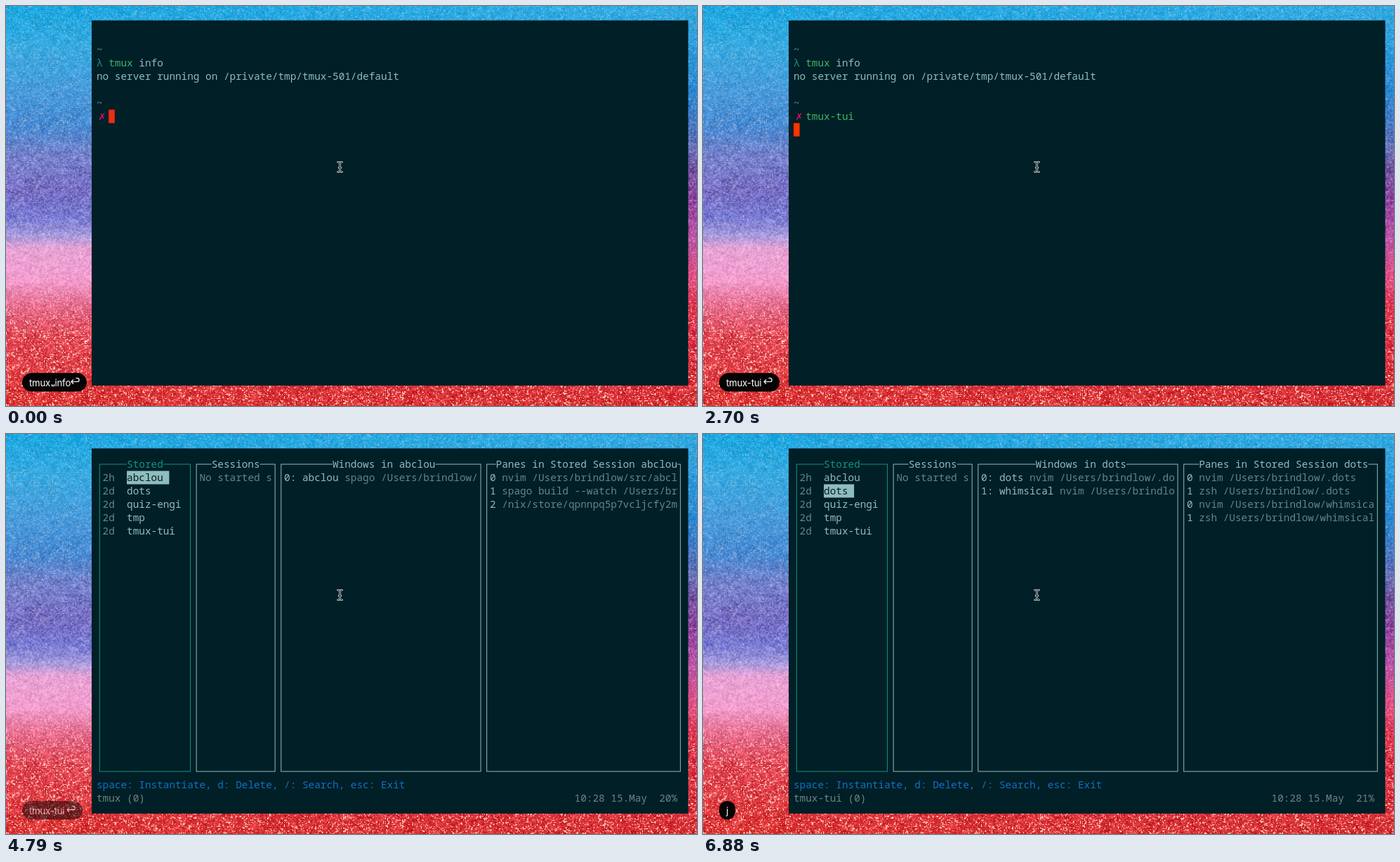
An HTML page with a canvas that plays this animation: 984 by 569 pixels, repeating every 8000 ms.

```html
<!DOCTYPE html>
<html lang="en">
<head>
<meta charset="utf-8">
<title>tmux-tui</title>
<style>
  html, body { margin: 0; width: 100%; height: 100%; overflow: hidden; background: #001f27; }
  canvas, svg { position: absolute; left: 0; top: 0; width: 984px; height: 569px; }
  text { white-space: pre; }
  #screen text { font: 14.36px "Noto Sans Mono", monospace; }
  #screen .bold { font-weight: 700; }
  #screen .cross { font: bold 13px "DejaVu Sans", sans-serif; }
  #keys text { font: 13.2px Inter, sans-serif; letter-spacing: -.2px; fill: #fff; }
  #keys path { fill: none; stroke: #fff; stroke-width: 1.2; }
</style>
</head>
<body>
<canvas id="wall" width="984" height="569"></canvas>
<svg viewBox="0 0 984 569">
  <defs><path id="beam" d="M472.5 222q3 0 3 2.5v9q0 2.500-3 2.500M478.500 222q-3 0-3 2.500M478.500 236q-3 0-3-2.500M474 230h3"/></defs>
  <rect x="122" y="20.5" width="849.5" height="519.5" fill="#001f27"/>
  <g id="screen"></g>
  <g id="keys"></g>
  <g fill="none" stroke-linecap="round">
    <use href="#beam" stroke="#d5dcde" stroke-width="2.600"/>
    <use href="#beam" stroke="#10181b"/>
  </g>
</svg>
<script>
const LOOP = 8000, CELL = 8.615, LINE = 19, LEFT = 129, TOP = 33.5;
const C = { bg: '#001f27', text: '#8fbdbd', dim: '#5d8989', gray: '#6f8285', teal: '#12947f',
            green: '#3db665', red: '#e50f1c', pink: '#d8106f', blue: '#1171c4', cursor: '#ff3300' };
const $ = id => document.getElementById(id);

// ---- wallpaper ----
const leftStops = [
  [0, 18, 165, 224], [60, 52, 168, 224], [120, 66, 152, 218], [170, 66, 136, 210],
  [210, 110, 126, 202], [260, 114, 106, 194], [300, 112, 116, 207], [325, 160, 150, 220],
  [345, 230, 160, 213], [390, 240, 152, 204], [425, 228, 104, 140], [470, 222, 64, 78], [569, 216, 44, 44]];
const rightStops = [
  [0, 45, 170, 226], [120, 34, 134, 212], [190, 82, 110, 186], [235, 115, 80, 160],
  [280, 142, 62, 156], [330, 184, 82, 164], [380, 222, 76, 132], [430, 220, 46, 72], [569, 210, 42, 46]];

const mix = (a, b, k) => a + (b - a) * k;
const ramp = (v, lo, hi) => Math.min(1, Math.max(0, (v - lo) / (hi - lo)));

function colorAt(stops, y) {
  let i = 1;
  while (i < stops.length - 1 && y > stops[i][0]) i++;
  const a = stops[i - 1], b = stops[i], k = ramp(y, a[0], b[0]);
  return [1, 2, 3].map(c => mix(a[c], b[c], k));
}

function hash(x, y) {
  let h = Math.imul(x, 374761393) ^ Math.imul(y, 668265263);
  h = Math.imul(h ^ (h >>> 13), 1274126177);
  return ((h ^ (h >>> 16)) >>> 0) / 4294967296;
}

function noise(x, y) {
  const i = Math.floor(x), j = Math.floor(y), u = x - i, v = y - j;
  return mix(mix(hash(i, j), hash(i + 1, j), u), mix(hash(i, j + 1), hash(i + 1, j + 1), u), v);
}

function paintWall() {
  const ctx = $('wall').getContext('2d'), img = ctx.createImageData(984, 569);
  for (let y = 0; y < 569; y++) {
    const l = colorAt(leftStops, y), r = colorAt(rightStops, y);
    const amp = 30 + 25 * ramp(y, 120, 230) - 20 * ramp(y, 300, 360) + 20 * ramp(y, 390, 450);
    const spark = .35 + .6 * ramp(y, 385, 470);
    for (let x = 0; x < 984; x++) {
      if (x > 123 && x < 970 && y > 21 && y < 539) continue;
      const k = x < 123 ? 0 : x / 984, p = (y * 984 + x) * 4;
      const g = .7 * noise(x / 1.7, y / 1.7) + .3 * noise(x / 7 + 90, y / 5) - .5;
      const hot = spark * ramp(noise(x / 1.5 + 300, y / 1.5), .6, .92);
      [255, 220, 208].forEach((s, c) => {
        img.data[p + c] = mix(mix(l[c], r[c], k) + g * amp * 1.5, s, hot);
      });
      img.data[p + 3] = 255;
    }
  }
  ctx.putImageData(img, 0, 0);
}

// ---- terminal ----
const colX = c => LEFT + c * CELL, rowY = r => TOP + r * LINE;
const put = (r, c, s, fill = C.text, cls = '') =>
  `<text x="${colX(c)}" y="${rowY(r) + 14.3}" fill="${fill}" class="${cls}">${s}</text>`;
const block = (r, c, n, fill) =>
  `<rect x="${colX(c)}" y="${rowY(r)}" width="${n * CELL}" height="${LINE}" fill="${fill}"/>`;
const cursor = (r, c, fill = C.cursor) => block(r, c, 1, fill);
const failure = 'no server running on /private/tmp/tmux-501/default';

function shell({ typed = '', color = C.green, ran = 0, tint }) {
  const out = put(1, 0, '~', C.dim) + put(2, 0, 'λ', C.teal) + put(2, 2, 'tmux', C.green) +
    put(2, 7, 'info') + put(3, 0, failure) + put(5, 0, '~', C.dim) +
    put(6, .3, '✗', C.pink, 'cross') + put(6, 2, typed, color, color === C.red ? 'bold' : '');
  if (!ran) return out + cursor(6, 2 + typed.length, tint);
  return out + (ran > 1 ? put(7, 0, failure) : '') + cursor(6 + ran, 0);
}

const status = (name, load) =>
  put(25, 0, `${name} (0)`, C.gray) + put(25, 79, `10:28 15.May  ${load}%`, C.gray);

const launch = () => put(0, 0, "^Ztmux-tui || echo 'Could not run: tmux-tui'") +
  cursor(1, 0) + status('tmux', 20);

function frame(c0, c1, title, at, color = C.text) {
  const x = colX(c0 + .5), y = rowY(.5);
  return `<rect x="${x}" y="${y}" width="${(c1 - c0) * CELL}" height="${23 * LINE}" fill="none" stroke="${color}"/>` +
    block(0, at, title.length, C.bg) + put(0, at, title, color);
}

const stored = [['2h', 'abclou'], ['2d', 'dots'], ['2d', 'quiz-engi'], ['2d', 'tmp'], ['2d', 'tmux-tui']];
const home = '/Users/brindlow';
const views = [
  { windows: [['0: abclou', `spago ${home}/`]],
    panes: [`nvim ${home}/src/abcl`, 'spago build --watch /Users/br', '/nix/store/qpnnpq5p7vcljcfy2m'],
    ids: [0, 1, 2], status: ['tmux', 20] },
  { windows: [['0: dots', `nvim ${home}/.do`], ['1: whimsical', 'nvim /Users/brindlo']],
    panes: [`nvim ${home}/.dots`, `zsh ${home}/.dots`, `nvim ${home}/whimsica`, `zsh ${home}/whimsical`],
    ids: [0, 1, 0, 1], status: ['tmux-tui', 21] }];

function tui({ pick }) {
  const view = views[pick], name = stored[pick][1], paneTitle = `Panes in Stored Session ${name}`;
  let out = frame(0, 15, 'Stored', 5, C.teal) + frame(16, 29, 'Sessions', 19) +
    frame(30, 63, `Windows in ${name}`, 39 + pick) + frame(64, 96, paneTitle, 66 + pick);
  stored.forEach(([age, s], i) => {
    const on = i === pick;
    if (on) out += block(i + 1, 5, s.length + 1, C.text);
    out += put(i + 1, 1, age, C.dim) + put(i + 1, 5, s, on ? C.bg : C.text);
  });
  out += put(1, 17, 'No started s', C.dim);
  view.windows.forEach(([s, cmd], i) => {
    out += put(i + 1, 31, s) + put(i + 1, 32 + s.length, cmd, C.dim);
  });
  view.panes.forEach((s, i) => {
    out += put(i + 1, 65, view.ids[i]) + put(i + 1, 67, s, C.dim);
  });
  return out + put(24, 0, 'space: Instantiate, d: Delete, /: Search, esc: Exit', C.blue) + status(...view.status);
}

// ---- keystroke pills: width, then text and an optional second word ----
const labels = {
  t: [24], tmu: [46], tmux: [53], 'tmux-t': [61], 'tmux-tui': [73], j: [23],
  'tmux-tui↩': [86, 'tmux-tui'], 'tmux info↩': [92, 'tmux', 'info']
};
const enter = x => `<path d="M${x + 3.5} 531.500l-3 3 3 3M${x + .5} 534.500h8.500a2.600 2.600 0 0 0 0-5.200h-2"/>`;

function pill(key, alpha = 1, lift = 0) {
  if (!key) return '';
  const [w, s = key, next] = labels[key], short = s.length === 1;
  let out = `<rect x="23" y="522" width="${w}" height="26.500" rx="${Math.min(13.25, w / 2)}" fill="#060304"/>` +
    `<text x="${short ? 23 + w / 2 : 33}" y="540.500" text-anchor="${short ? 'middle' : 'start'}">${s}</text>`;
  if (next) out += `<path d="M65.500 538v2.500h3v-2.500"/><text x="69.500" y="540.500">${next}</text>`;
  if (key.endsWith('↩')) out += enter(w + .5);
  return `<g opacity="${alpha}" transform="translate(0 ${-lift})">${out}</g>`;
}

// ---- timeline ----
const steps = [
  { at: 0, draw: shell, tint: '#f02c12', key: 'tmux info↩' },
  { at: 1500, draw: shell, typed: 't', key: 't', old: 'tmux info↩' },
  { at: 1650, draw: shell, typed: 'tm', color: C.red, key: 't' },
  { at: 1800, draw: shell, typed: 'tmux', key: 'tmu' },
  { at: 1950, draw: shell, typed: 'tmux-', color: C.red, key: 'tmux' },
  { at: 2100, draw: shell, typed: 'tmux-t', color: C.red, key: 'tmux-t' },
  { at: 2250, draw: shell, typed: 'tmux-tui', key: 'tmux-tui' },
  { at: 2700, draw: shell, typed: 'tmux-tui', ran: 1, key: 'tmux-tui↩' },
  { at: 2840, draw: shell, typed: 'tmux-tui', ran: 2, key: 'tmux-tui↩' },
  { at: 3290, draw: launch, key: 'tmux-tui↩' },
  { at: 3590, draw: tui, pick: 0, key: 'tmux-tui↩' },
  { at: 4790, draw: tui, pick: 0, key: 'tmux-tui↩', alpha: .5 },
  { at: 4940, draw: tui, pick: 0 },
  { at: 6730, draw: tui, pick: 0, key: 'j' },
  { at: 6880, draw: tui, pick: 1, key: 'j' }];

let shown;
function show(time) {
  const step = steps.findLast(s => s.at <= time);
  if (step === shown) return;
  shown = step;
  $('screen').innerHTML = step.draw(step);
  $('keys').innerHTML = pill(step.old, .66, 34) + pill(step.key, step.alpha);
}

paintWall();
show(0);
const start = performance.now();
(function tick() {
  show((performance.now() - start) % LOOP);
  requestAnimationFrame(tick);
})();
</script>
</body>
</html>
```
